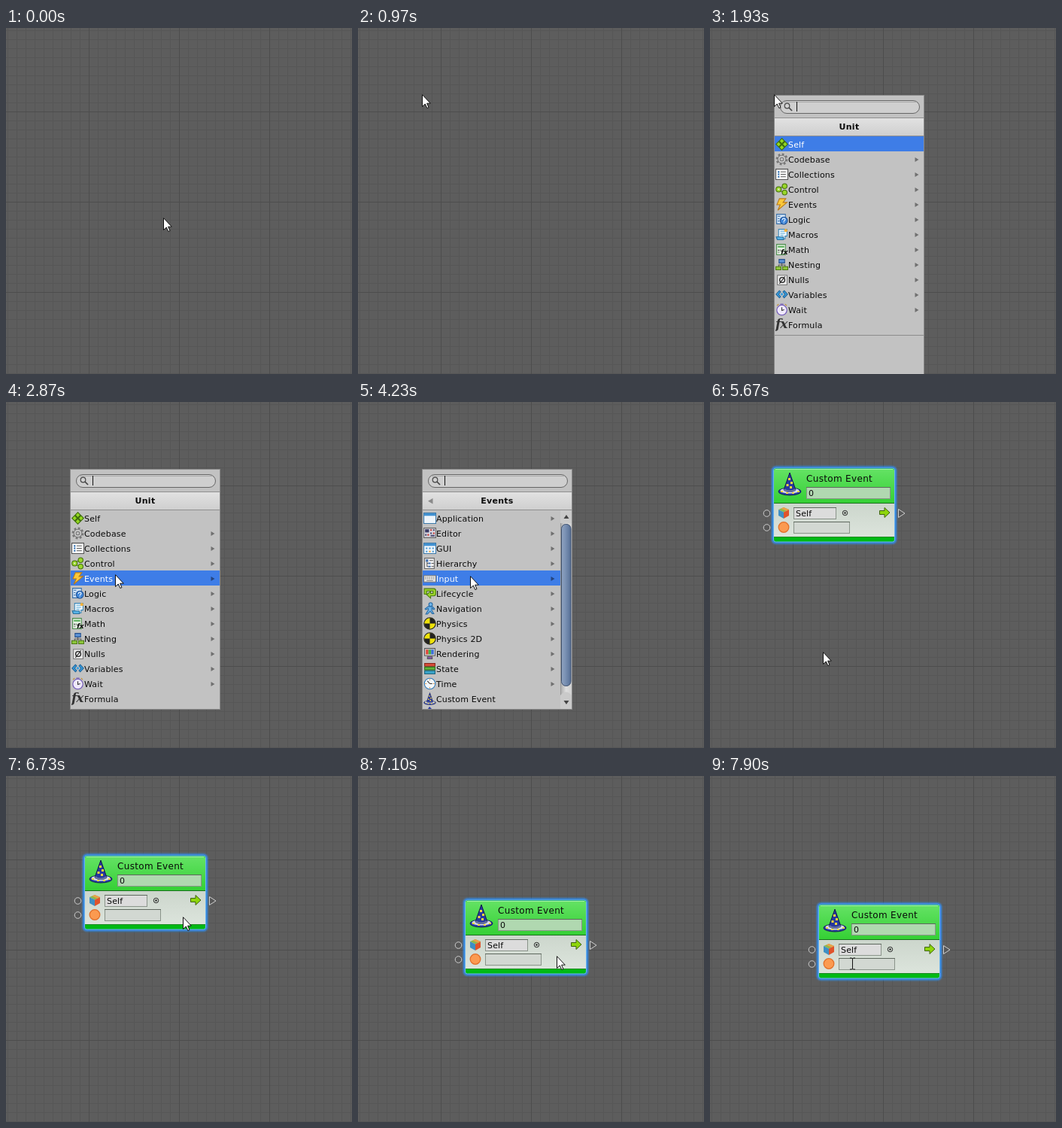
These frames come from a looping animation (460 px wide and 460 px high, 8000 ms). An HTML page:

```html
<!DOCTYPE html>
<html lang="en">
<head>
<meta charset="utf-8">
<title>Adding a custom event node</title>
<style>
  html, body { margin: 0; width: 100%; height: 100%; overflow: hidden; background: #5d5d5d; }
  svg { display: block; }
  text { font: 11px "DejaVu Sans", Verdana, sans-serif; letter-spacing: .15px; fill: #0a0a0a; }
  .title { font-weight: bold; text-anchor: middle; letter-spacing: .25px; }
  .name { font-size: 12px; letter-spacing: .33px; }
  .bar { fill: none; }
  .on .bar { fill: #3e7de7; }
  .on text { fill: #fff; }
  .more { fill: #707070; }
  .on .more { fill: #25457f; }
  .port { fill: #575757; stroke: #cfcfcf; }
</style>
</head>
<body>
<svg id="stage" width="100%" height="100%" viewBox="0 0 460 460">
  <defs>
    <pattern id="minor" x="2" y="3" width="12" height="12" patternUnits="userSpaceOnUse">
      <path d="M0 .5H12M.5 0V12" stroke="#565656"/>
    </pattern>
    <pattern id="major" x="110" y="111" width="120" height="120" patternUnits="userSpaceOnUse">
      <path d="M0 .5H120M.5 0V120" stroke="#4d4d4d"/>
    </pattern>
    <linearGradient id="head" x2="0" y2="1"><stop stop-color="#64e264"/><stop offset="1" stop-color="#35d035"/></linearGradient>
    <linearGradient id="body" x2="0" y2="1"><stop stop-color="#ccd6cc"/><stop offset="1" stop-color="#dce4dc"/></linearGradient>
    <linearGradient id="strip" x2="0" y2="1"><stop stop-color="#e2e2e2"/><stop offset="1" stop-color="#cecece"/></linearGradient>
    <linearGradient id="thumb"><stop stop-color="#8fa3c0"/><stop offset=".4" stop-color="#7b92b4"/><stop offset="1" stop-color="#566f96"/></linearGradient>
    <linearGradient id="track"><stop stop-color="#a9a9a9"/><stop offset=".5" stop-color="#dedede"/><stop offset="1" stop-color="#d0d0d0"/></linearGradient>
    <filter id="blur" x="-10%" y="-10%" width="120%" height="120%"><feGaussianBlur stdDeviation="1.3"/></filter>
    <clipPath id="view"><rect x="86" y="119" width="198" height="289"/></clipPath>
    <symbol id="hat" viewBox="0 0 32 32">
      <ellipse cx="16" cy="26" rx="15" ry="5" fill="#2b3fa8" stroke="#151d55"/>
      <ellipse cx="16" cy="25" rx="12.5" ry="3.4" fill="#d9dcec"/>
      <path d="M16 1L8 24Q16 29 24 24Z" fill="#27389f" stroke="#10174a"/>
      <path d="M8.6 22Q16 27 23.4 22L24 25Q16 29 8 25Z" fill="#66719f"/>
      <path d="M14 8h3v3h-3zM17 13h3v3h-3zM11.5 16h3v3h-3zM16 19h3v3h-3zM4 25h3v2H4zM11 27h3v2h-3zM19 27h3v2h-3zM26 25h3v2h-3z" fill="#f7d83e"/>
    </symbol>
  </defs>

  <rect width="460" height="460" fill="#5d5d5d"/>
  <rect width="460" height="460" fill="url(#minor)"/>
  <rect width="460" height="460" fill="url(#major)"/>

  <g id="node">
    <rect x="83.5" y="87" width="163" height="100" rx="4" fill="none" stroke="#2f8ff5" stroke-width="3" filter="url(#blur)"/>
    <rect x="84.5" y="88" width="161" height="98" rx="3" fill="#00b914" stroke="#6bb4f0"/>
    <path d="M85 134V91q0-2 2-2H243q2 0 2 2V134Z" fill="url(#head)"/>
    <path d="M87 89.5H243" stroke="#a5f0a5"/>
    <rect x="85" y="135" width="160" height="44" fill="url(#body)"/>
    <path d="M85 134.5H245" stroke="#16701a"/>
    <path d="M85 179.5H245" stroke="#1a8a22"/>
    <use href="#hat" x="90" y="93" width="32" height="32"/>
    <text class="name" x="128" y="106">Custom Event</text>
    <g id="fields"></g>
    <text x="131" y="125">0</text>
    <text x="114" y="152">Self</text>
    <path d="M98 140l7 3-7 3.500-7-3.500z" fill="#8fb84a"/>
    <path d="M91 143l7 3.500V155l-7-4z" fill="#3f8fc4"/>
    <path d="M105 143l-7 3.500V155l7-4z" fill="#e0532b"/>
    <path d="M98 140l7 3-3.500 1.700-7-3z" fill="#eda04a"/>
    <circle cx="179.500" cy="147.500" r="3.200" fill="none" stroke="#222"/>
    <circle cx="179.500" cy="147.500" r="1.200" fill="#222"/>
    <path d="M225.500 144.500H232V140.500L239 147l-7 6.500V149.500H225.500Z" fill="#8ed60c" stroke="#3e6310"/>
    <circle cx="98" cy="166.500" r="6.800" fill="#fb9a50" stroke="#e2702a" stroke-width="1.300"/>
    <circle class="port" cx="75.500" cy="148" r="4.300"/>
    <circle class="port" cx="75.500" cy="167" r="4.300"/>
    <path class="port" d="M250.500 142.500L259 148l-8.500 5.500Z"/>
  </g>

  <g id="menu">
    <g id="footer">
      <rect x="85.500" y="348.500" width="199" height="60" fill="#c2c2c2" stroke="#888"/>
    </g>
    <rect x="85.500" y="89.500" width="199" height="319" fill="#c2c2c2" stroke="#8c8c8c"/>
    <rect x="93.500" y="96.500" width="185" height="17" rx="8.500" fill="#cfcfcf" stroke="#666"/>
    <path d="M97 98.500H275" stroke="#a8a8a8"/>
    <circle cx="102.500" cy="103.500" r="3.300" fill="none" stroke="#444" stroke-width="1.200"/>
    <path d="M105 106l4 4" stroke="#444" stroke-width="1.700"/>
    <path d="M115.500 98V111" stroke="#111"/>
    <g clip-path="url(#view)">
      <g id="root"></g>
      <g id="events"></g>
    </g>
  </g>

  <g id="cursor">
    <path id="arrow" d="M.5 .7V16.500L4.300 13 6.800 18.500 9 17.600 6.600 12.200H11.300Z" fill="#fff" stroke="#111"/>
    <path id="beam" d="M-3.500 -7.500h2.500l1 1 1-1h2.500M0 -6.500V6.500M-3.500 7.500h2.500l1-1 1 1h2.500" fill="none" stroke="#111"/>
  </g>
</svg>

<script>
const $ = id => document.getElementById(id);
const p = (d, fill, stroke = "none") => `<path d="${d}" fill="${fill}" stroke="${stroke}"/>`;
const ball = (x, y, r, fill, stroke = "none") => `<circle cx="${x}" cy="${y}" r="${r}" fill="${fill}" stroke="${stroke}"/>`;
const windowIcon = p("M.5 1.500h15v13H.500z", "#eef5fb", "#3b78a8") + p("M1 2h14v3H1z", "#3d8fd0");
const physics = ball(8, 8, 7.300, "#efe20a", "#222") + p("M8 8V1A7 7 0 0 1 15 8ZM8 8V15A7 7 0 0 1 1 8Z", "#222");
const sheet = p("M1.500 1.500h12v13h-12z", "#f4f4f4", "#666");

const icons = {
  Self: p("M8 .7l3.300 3.300L8 7.300 4.700 4zM8 8.700l3.300 3.300L8 15.300 4.700 12zM4 4.700l3.300 3.300L4 11.300.7 8zM12 4.700l3.300 3.300-3.300 3.300L8.700 8z", "#93d820", "#3f6c0c"),
  Codebase: `<circle cx="8" cy="8" r="6.300" fill="none" stroke="#777" stroke-width="2.400" stroke-dasharray="2.600 2.350"/>` + ball(8, 8, 5, "#c9c9c9", "#777") + ball(8, 8, 2.200, "#c2c2c2", "#777"),
  Collections: p("M.5 1.500h15v13H.500z", "#fff", "#555") + p("M3 4h2v2H3zM3 7h2v2H3zM3 10h2v2H3z", "#2b6cb0") + p("M6.500 5H13M6.500 8H13M6.500 11H13", "none", "#555"),
  Control: p("M4 8L11 3M4 8L11 13", "none", "#4c7d10") + ball(4, 8, 3.300, "#9ad82a", "#456f0c") + ball(11.500, 4, 3, "#9ad82a", "#456f0c") + ball(11.500, 12, 3, "#9ad82a", "#456f0c") + ball(4, 8, 1, "#eee"),
  Events: p("M5 .8H13L9.500 5.500H14.500L3 15.300 6 8.500H1.800Z", "#fbc93a", "#b8791a"),
  Logic: p("M1.500 1.500h11v12h-11z", "#cfe3f7", "#3a6ea5") + p("M3 4h3M3 7h2M3 10h2", "none", "#3a6ea5") + ball(10.500, 9.500, 4.600, "#3f86d8", "#1d4f92") + p("M8.800 8.500q0-2 1.700-2t1.700 1.700q0 1-1.700 2v.8M10.500 12v1", "none", "#fff"),
  Macros: p("M4 1.500H14.500V10H12V13.500H2V11H4Z", "#f1f8fd", "#3a86b8") + p("M6 4h6M6 6.500h6M6 9h4", "none", "#59a9d8") + p("M1 11H10V14.500H2.500Z", "#57b2e6", "#2a6f9c") + ball(13, 3, 2, "#f4b13c"),
  Math: p("M1.500 1.500h11v13h-11z", "#e4f2e2", "#4b8a4b") + p("M3 3.500h8v2H3z", "#5db05d") + p("M3 8h2v2H3zM6 8h1v2H6zM3 11.500h2v1H3z", "#777") + `<text x="6.500" y="14.500" style="font:italic bold 9px 'DejaVu Sans',sans-serif;letter-spacing:-.5px;fill:#111">fx</text>`,
  Nesting: p("M8 6v4M4 11V8.500h8V11", "none", "#555") + p("M4.500 1.500h7v4.500h-7z", "#5c93d8", "#27518c") + p("M.5 10.500h6.500v4H.500zM9 10.500h6.500v4H9z", "#8cc63a", "#4d7716"),
  Nulls: p("M2.500 2.500h12v12h-12z", "#e9e9e9", "#777") + `<circle cx="8.500" cy="8.500" r="3.200" fill="none" stroke="#222" stroke-width="1.300"/>` + p("M5 13L12 4", "none", "#222"),
  Variables: p("M5 3L.8 7.500 5 12 6.500 10.500 4 7.500 6.500 4.500ZM11 3l4.200 4.500L11 12 9.500 10.500 12 7.500 9.500 4.500Z", "#3aa0e0", "#1d639a") + p("M8 5.500l2 2-2 2-2-2z", "#3aa0e0"),
  Wait: ball(8, 8.500, 6.300, "#efe9fb", "#6a4fb5") + p("M6 1h4", "none", "#6a4fb5") + p("M2 3l2-2M14 3l-2-2", "none", "#c08a2a") + p("M8 5v4l3-1", "none", "#333"),
  Formula: `<text x="0" y="12.500" style="font:italic bold 16px 'DejaVu Serif','Liberation Serif',serif;letter-spacing:-1px;fill:#333">fx</text>`,
  Application: windowIcon,
  Editor: p("M.5 1.500h15v12H.500z", "#d9d9e2", "#666") + p("M2 3h5v4H2z", "#3c3c66") + p("M8.500 3h2v2h-2zM12 7h2v2h-2zM5 9h2v2H5z", "#c9382f") + p("M12 3h2v2h-2zM8.500 7h2v2h-2zM2 9h2v2H2zM9 10h5v2H9z", "#4a4a70"),
  GUI: windowIcon + p("M3 7h2v2H3zM7 7h2v2H7zM11 7h2v2h-2zM3 11h2v2H3zM11 11h2v2h-2z", "#4a9ad4") + p("M7 11h2v2H7z", "#e8a13a"),
  Hierarchy: sheet + p("M3 3h3v3H3zM6 7h3v2H6zM6 11h3v2H6z", "#3f6fb0") + p("M4.500 6v6H6M4.500 8H6M7.500 4.500H12M10 8h3M10 12h3", "none", "#555"),
  Input: p("M.5 4.500h15v8H.500z", "#e6e6e6", "#777") + p("M2 6.500h12M2 8.500h12", "none", "#888").replace("/>", ' stroke-dasharray="1.500 1"/>') + p("M4 10.700h8", "none", "#888"),
  Lifecycle: p("M1 2H13Q15.500 2 15.500 5V8Q15.500 11 13 11H9V14L4 9.500 9 5.500V8H12V5H4V9H1Z", "#9ad42a", "#4a7a10"),
  Navigation: ball(9, 3, 2.300, "#6db4ea", "#2a6ba3") + p("M6 5.500h5l3 3-1 1-2.500-2v3l2.500 4H11L8.500 11.500 5 15H3L6 10V8L3 9.500 2 8.500Z", "#6db4ea", "#2a6ba3"),
  Physics: physics,
  "Physics 2D": physics,
  Rendering: p("M1.500 1.500h13v9h-13z", "#ddd", "#555") + p("M3 3h3.300v6H3z", "#e0463a") + p("M6.300 3h3.300v6H6.300z", "#48b04a") + p("M9.600 3H13v6H9.600z", "#3c6fd8") + p("M5 12h6v2.500H5z", "#8a55b8", "#555"),
  State: p("M1.500 1.500h13v3.500h-13z", "#e0503c", "#8a281c") + p("M1.500 6h13v3.500h-13z", "#5fb63a", "#33701b") + p("M1.500 10.500h13v4h-13z", "#3aa3c8", "#1d647e"),
  Time: ball(8, 8, 6.800, "#f3f8fc", "#2f79b8") + p("M8 8L5 4.500M8 8h3", "none", "#333") + p("M8 2.300v1.500M13.700 8h-1.500M8 13.700v-1.500M2.300 8h1.500", "none", "#e08a2a"),
  "Custom Event": `<use href="#hat" width="16" height="16"/>`
};

const leaf = ["Self", "Formula", "Custom Event"];

const row = (name, i, width) => `<g class="row" transform="translate(0 ${144 + 20 * i})">
  <rect class="bar" x="85" width="${width}" height="20"/>
  <svg x="87" y="2" width="17" height="17" viewBox="0 0 16 16">${icons[name]}</svg>
  <text x="104" y="15">${name}</text>
  ${leaf.includes(name) ? "" : `<path class="more" d="M${width + 72.500} 8l5 3-5 3z"/>`}</g>`;

const page = (title, names, width, extra = "") => `
  <rect x="86" y="119" width="198" height="25" fill="url(#strip)"/>
  <path d="M86 119.500H284M86 143.500H284" stroke="#8f8f8f"/>
  <text class="title" x="185" y="135">${title}</text>
  <g class="list">${names.map((n, i) => row(n, i, width)).join("")}${extra}</g>`;

const scrollbar = `
  <rect x="269" y="144" width="15" height="264" fill="url(#track)"/>
  <path d="M269.500 144V408" stroke="#999"/>
  <path d="M269 144h15v17h-15zM269 391h15v17h-15z" fill="#cacaca"/>
  <path d="M269 390q7.500-9 15 0v2h-15z" fill="#cacaca"/>
  <path d="M273.500 155l3.500-5 3.500 5zM273.500 397l3.500 5 3.500-5z" fill="#444"/>
  <rect x="270.500" y="162.500" width="12.500" height="215" rx="6" fill="url(#thumb)" stroke="#3d4f6c"/>
  <path d="M95 405l-2 3h5z" fill="#27389f"/>`;

const names = Object.keys(icons);
$("root").innerHTML = page("Unit", names.slice(0, 13), 200);
$("events").innerHTML = page("Events", names.slice(13), 184, scrollbar)
  + `<path d="M99.500 128v7.500L93 131.800z" fill="#8a8a8a"/>`;

const field = (x, y, w, fill) => `<rect x="${x}.500" y="${y}.500" width="${w}" height="15" fill="${fill}" stroke="#8a948a"/>
  <path d="M${x} ${y}.500h${w + 1}" stroke="#5e685e"/>`;
$("fields").innerHTML = field(128, 113, 111, "#b0d8b0") + field(111, 140, 56, "#dcdcdc") + field(111, 159, 74, "#d2d8d2");

// Pointer path: time, x, y
const path = [
  [0, 209, 252], [833, 88, 94], [967, 85, 88],
  [2240, 85, 88], [2470, 112, 164], [2867, 145, 229], [3000, 149, 231],
  [4225, 149, 231], [4620, 147, 385], [5033, 145, 390], [5100, 144, 392],
  [5540, 144, 392], [5667, 150, 332], [6000, 185, 225], [6367, 204, 162],
  [6430, 205, 159], [6520, 206, 160], [6700, 225, 177], [6733, 235, 187],
  [6950, 257, 222], [7167, 265, 242],
  [7300, 265, 242], [7530, 236, 214], [7720, 210, 222], [7900, 189, 250]
];

const slope = (i, k) => (path[i + 1][k] - path[i][k]) / (path[i + 1][0] - path[i][0]);
function tangent(i, k) {
  if (i === 0 || i === path.length - 1) return 0;
  const a = slope(i - 1, k), b = slope(i, k);
  return a * b > 0 ? 2 * a * b / (a + b) : 0;
}

// Monotone cubic through the path points
function pointer(t) {
  const end = path.length - 1;
  if (t >= path[end][0]) return path[end].slice(1);
  let i = 0;
  while (path[i + 1][0] <= t) i++;
  const span = path[i + 1][0] - path[i][0], u = (t - path[i][0]) / span;
  return [1, 2].map(k => Math.round(
    path[i][k] + (path[i + 1][k] - path[i][k]) * u * u * (3 - 2 * u)
    + span * u * (1 - u) * ((1 - u) * tangent(i, k) - u * tangent(i + 1, k))));
}

const ramp = (t, a, b) => {
  const u = Math.min(1, Math.max(0, (t - a) / (b - a)));
  return u * u * (3 - 2 * u);
};
const show = (el, on) => el.setAttribute("visibility", on ? "inherit" : "hidden");
const move = (id, x, y) => $(id).setAttribute("transform", `translate(${x} ${y})`);
const select = (id, n) => $(id).querySelectorAll(".row").forEach((r, i) => r.classList.toggle("on", i === n));
const rootList = $("root").querySelector(".list"), eventList = $("events").querySelector(".list");
const grab = [205, 159];

function draw(ms) {
  const t = Math.floor((Math.floor(ms / 10) * 10 + 5) * 3 / 100) * 100 / 3;
  const [x, y] = pointer(t);
  const hover = y < 144 ? 0 : Math.min(12, Math.floor((y - 144) / 20));

  show($("menu"), t > 1225 && t < 5290);
  show(rootList, t > 1260);
  show(eventList, t > 3820);
  select("root", t < 1490 ? -1 : hover);
  select("events", t < 4225 ? 0 : hover);
  const slide = Math.round(200 * ramp(t, 3110, 3600));
  move("root", -slide, 0);
  move("events", 200 - slide, 0);
  const open = ramp(t, 1470, 2000) - ramp(t, 2470, 2840) + ramp(t, 4610, 5020);
  move("footer", 0, Math.round(60 * open));

  show($("node"), t > 5390);
  const held = t > 6463 ? pointer(Math.min(t - 100 / 3, 7167)) : grab;
  const dx = held[0] - grab[0], dy = held[1] - grab[1];
  move("node", dx, dy);

  const typing = t > 7300 && x > 171 && x < 246 && y > 242 && y < 259;
  show($("arrow"), !typing);
  show($("beam"), typing);
  move("cursor", typing ? x + .5 : x, typing ? y - .5 : y);
}

const start = performance.now();
function tick() {
  draw((performance.now() - start) % 8000);
  requestAnimationFrame(tick);
}
tick();
</script>
</body>
</html>
```
